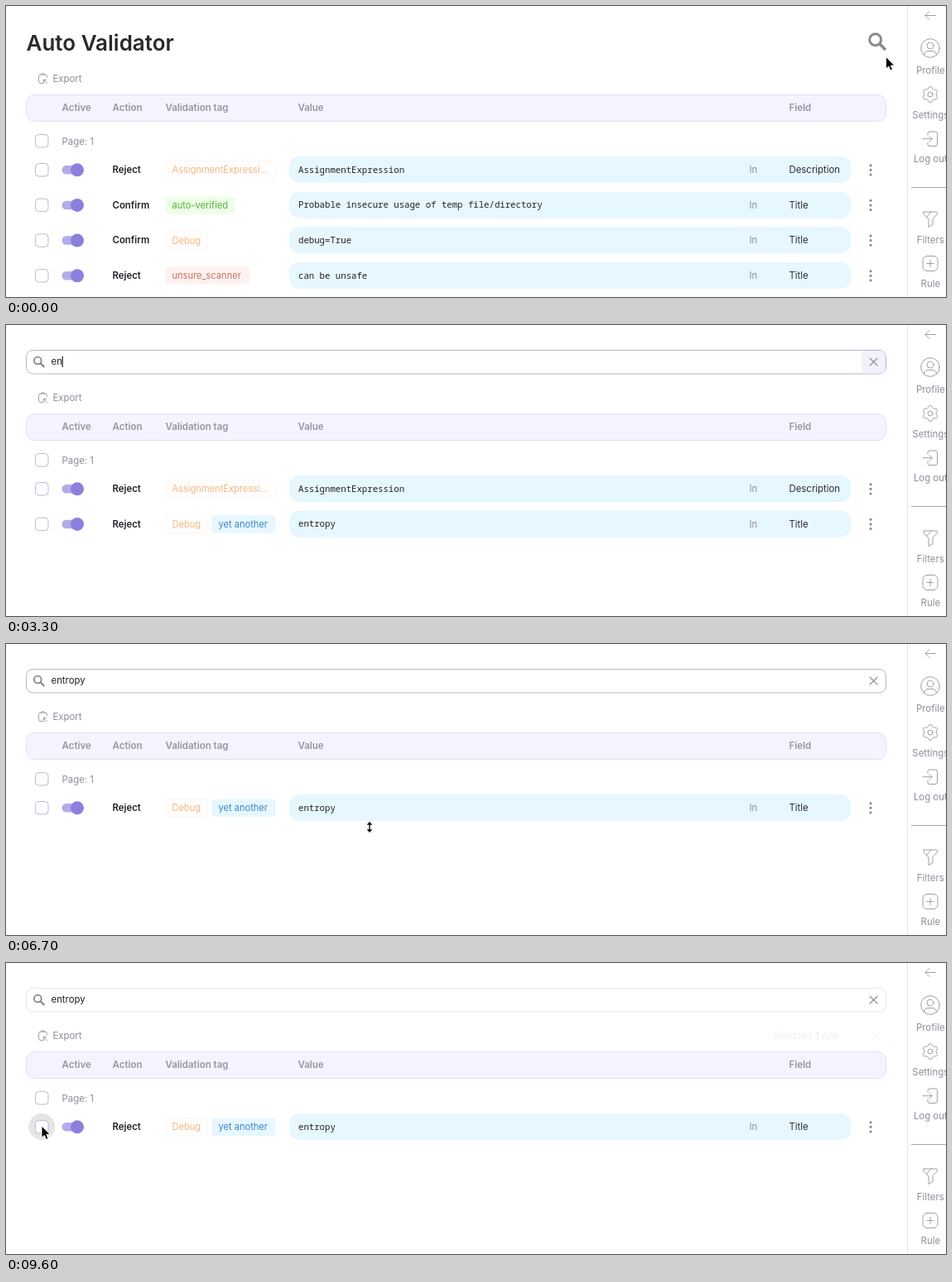
These frames come from a looping animation (1135x352 px, 9.7 s). An HTML page:

```html
<!DOCTYPE html>
<html lang="en">
<head>
<meta charset="utf-8">
<title>Rule search</title>
<style>
  html, body { margin: 0; width: 100%; height: 100%; overflow: hidden; background: #fff; }
  svg { display: block; width: 1135px; height: 352px; }
  text { font: 400 11.4px Inter, sans-serif; fill: #2b2b33; }
  .bold { font-weight: 600; fill: #222228; }
  .title { font-size: 26px; font-weight: 600; fill: #29292e; }
  .head { font-size: 11.5px; font-weight: 600; fill: #9795a1; }
  .soft { fill: #8f8e99; }
  .hint { font-size: 10.6px; }
  .mono { font: 400 10.68px "Noto Sans Mono", monospace; fill: #222; }
  .query { fill: #222; }
  .mid { text-anchor: middle; }
  .tag { font-size: 11.1px; }
  .line { fill: none; stroke: #95949f; stroke-width: .9; stroke-linecap: round; stroke-linejoin: round; }
  .box { fill: #fff; stroke: #bdb9d2; }
  .lens { fill: none; stroke: #8b8b8b; }
</style>
</head>
<body>
<svg id="stage" viewBox="0 0 1135 352"></svg>
<script>
const LOOP = 9700, STEP = 100, ROW_TOP = 198, ROW_GAP = 42.65;
const stage = document.getElementById('stage');

const text = (x, y, str, cls = '', extra = '') =>
  `<text x="${x}" y="${y}" class="${cls}" ${extra}>${str}</text>`;
const rect = (x, y, w, h, r, attrs) =>
  `<rect x="${x}" y="${y}" width="${w}" height="${h}" rx="${r}" ${attrs}/>`;
const circle = (x, y, r, attrs) => `<circle cx="${x}" cy="${y}" r="${r}" ${attrs}/>`;
const path = (d, attrs = 'class="line"') => `<path d="${d}" ${attrs}/>`;
const group = (id, body, attrs = '') => `<g id="${id}" ${attrs}>${body}</g>`;
const checkbox = y => rect(35.5, y - 7.5, 15.5, 15.5, 4, 'class="box"');

const TAGS = {
  assign: ['AssignmentExpressi…', 133, '#fffefd', '#f0b885', '#faf7f4'],
  verified: ['auto-verified', 84, '#eeffe8', '#55b236', 'none'],
  debug: ['Debug', 51, '#fffefd', '#f0b885', '#faf7f4'],
  unsure: ['unsure_scanner', 102, '#fef2f0', '#cb705a', 'none'],
  another: ['yet another', 77, '#e6f7ff', '#3a86c6', 'none'],
};
const RULES = [
  ['Reject', ['assign'], 'AssignmentExpression', 'Description'],
  ['Confirm', ['verified'], 'Probable insecure usage of temp file/directory', 'Title'],
  ['Confirm', ['debug'], 'debug=True', 'Title'],
  ['Reject', ['unsure'], 'can be unsafe', 'Title'],
  ['Reject', ['debug', 'another'], 'entropy', 'Title'],
];

function tagList(names) {
  let x = 192.5;
  return names.map(name => {
    const [label, w, fill, ink, edge] = TAGS[name];
    const out = rect(x, -10.5, w, 21.5, 4, `fill="${fill}" stroke="${edge}"`) +
      text(x + 8, 4.3, label, 'tag', `style="fill:${ink}"`);
    x += w + 5;
    return out;
  }).join('');
}

const ruleRow = ([action, tags, value, field], i) => group('rule' + i,
  checkbox(0) +
  rect(67.5, -5, 25, 10.5, 5.2, 'fill="#b3abea"') + circle(86, .3, 8, 'fill="#8b80dc"') +
  text(128.5, 4, action, 'bold') + tagList(tags) +
  rect(342, -16, 678, 32, 12, 'fill="#e6f7ff"') +
  text(353, 3.7, value, 'mono') + text(897.5, 4, 'In', 'soft') + text(945.5, 4, field) +
  [-5.6, 0, 5.6].map(y => circle(1044, y + .3, 1.5, 'fill="#85848f"')).join(''));

function gear(cx, cy) {
  const points = [];
  for (let i = 0; i < 48; i++) {
    const a = i / 48 * 2 * Math.PI, r = 8.3 + 1.1 * Math.tanh(2.5 * Math.cos(6 * a));
    points.push(`${(cx + r * Math.sin(a)).toFixed(2)} ${(cy - r * Math.cos(a)).toFixed(2)}`);
  }
  return path('M' + points.join('L') + 'Z') + circle(cx, cy, 3, 'class="line"');
}

const sidebar =
  path('M1088.5 0V352', 'stroke="#e2e1e6"') +
  path('M1122.5 11.5H1110M1115 6.5L1110 11.5L1115 16.5') +
  circle(1116, 51, 11.3, 'class="line"') + circle(1116, 48, 4, 'class="line"') +
  path('M1108.5 59Q1109.5 54.5 1113 54.5H1119Q1122.5 54.5 1123.5 59') +
  gear(1116, 107) +
  path('M1113 156V154Q1113 152 1115 152H1122Q1124.5 152 1124.5 154.5V167Q1124.5 169.5 1122 169.5H1115Q1113 169.5 1113 167.5V165M1107 160.7H1118M1115 157.5L1118.2 160.7L1115 164') +
  path('M1093 219.5H1135', 'stroke="#a8a8ac"') +
  path('M1108.5 249H1123.5Q1125 249 1124.5 251.5L1119 257.5V264.5L1114 267.5V258L1108 251.5Q1107 249 1108.5 249ZM1117 249L1111.5 255.5') +
  rect(1107, 302.5, 18, 18, 5, 'class="line"') + path('M1116 307.5V315.5M1112 311.5H1120') +
  [['Profile', 82], ['Settings', 136], ['Log out', 188.5], ['Filters', 286.5], ['Rule', 339.5]]
    .map(([label, y]) => text(1116.3, y, label, 'soft mid')).join('');

const exportButton =
  path('M45 93.5H42Q39.5 93.5 39.5 91V85.5Q39.5 83 42 83H47Q49.5 83 49.5 85.5V86.5M42.5 83.5Q42.5 81.5 44.5 81.5Q46.5 81.5 46.5 83.5M49.5 94L45.5 89.5M45.5 92.5V89.3H48.7') +
  text(56.5, 91.7, 'Export', 'soft');

const tableHead =
  rect(24.5, 107.5, 1038, 32, 10, 'fill="#f5f3ff" stroke="#e2dff0"') +
  [[67.5, 'Active'], [128.5, 'Action'], [192.5, 'Validation tag'], [352.5, 'Value'], [945.5, 'Field']]
    .map(([x, label]) => text(x, 127.3, label, 'head')).join('') +
  checkbox(163) + text(67.5, 167.5, 'Page: 1', 'soft');

const titleBar =
  circle(1052.5, 43.5, 23, 'id="lensHover" fill="#000" opacity="0"') +
  circle(1052.5, 43.5, 0, 'id="ripple" fill="#000" opacity=".1"') +
  text(24.5, 54, 'Auto Validator', 'title') +
  circle(1049.7, 40.7, 7, 'class="lens" stroke-width="3"') +
  path('M1054.8 45.8L1062 53', 'class="lens" stroke-width="3.6"');

const searchBar =
  rect(24.5, 30.5, 1038, 28.5, 8, 'id="field" fill="#fff"') +
  circle(38.3, 43, 4.4, 'class="lens" stroke-width="1.9"') +
  path('M41.5 46.2L46.3 51', 'class="lens" stroke-width="2.4"') +
  text(54.5, 48.3, 'Search..', 'soft hint', 'id="hint"') +
  text(54.5, 48.3, '', 'query', 'id="query"') +
  path('M1033 31H1054.5Q1062 31 1062 38.5V51Q1062 58.5 1054.5 58.5H1040Q1033 58.5 1033 51.5Z', 'id="clearHover" fill="#f3f0fc"') +
  path('M1043.2 40.2L1052 49M1052 40.2L1043.2 49', 'id="clear" class="line" style="stroke-width:1.3"') +
  rect(0, 38, 1.1, 13, 0, 'id="caret" fill="#111"');

const selection =
  text(926.5, 91.7, 'Selected <tspan font-weight="700">1</tspan> rule', 'soft') +
  path('M1046.5 84L1054.5 92M1054.5 84L1046.5 92');

const pointers =
  group('arrow', path('M0 0V14.5L3.3 11.5L5.5 16.5L8.1 15.4L5.9 10.5H10.3Z',
    'fill="#000" stroke="#fff" stroke-width="1"')) +
  group('resize', path('M0 -7L4 -2.5H1V2.5H4L0 7L-4 2.5H-1V-2.5H-4Z',
    'fill="#000" stroke="#fff" stroke-width=".7"'));

stage.innerHTML = sidebar + exportButton + tableHead +
  group('titleBar', titleBar) + group('searchBar', searchBar) + group('selection', selection) +
  circle(43.3, 198, 16, 'id="checkHover" fill="#000" opacity=".1"') +
  RULES.map(ruleRow).join('') +
  group('checked', rect(35, 190, 16.5, 16.5, 4, 'fill="#8b80dc"') +
    path('M39 198.3L42 201.3L47.5 195.3', 'fill="none" stroke="#fff" stroke-width="1.7"')) +
  pointers;

const el = {};
stage.querySelectorAll('[id]').forEach(node => el[node.id] = node);
const show = (id, on) => el[id].style.display = on ? '' : 'none';
const set = (id, name, value) => el[id].setAttribute(name, value);
const clamp = v => Math.max(0, Math.min(1, v));

// Pointer stops: time, x, y
const TRACK = [
  [0, 1062.5, 61.5], [100, 1061.5, 60], [400, 1054, 50], [700, 1049.5, 47], [1500, 1049.5, 47],
  [1700, 1046, 41], [5600, 1046, 41], [5700, 1003, 66], [6000, 690, 170], [6300, 470, 232],
  [6500, 445, 227], [6700, 439, 221.5], [7600, 424, 214], [7800, 270, 205], [8100, 91.5, 194],
  [8300, 86, 195], [8600, 43, 197], [LOOP, 43, 197],
];
function pointerAt(t) {
  const i = TRACK.findIndex(stop => stop[0] > t);
  const [t0, x0, y0] = TRACK[i - 1], [t1, x1, y1] = TRACK[i];
  const k = (t - t0) / (t1 - t0);
  return [x0 + (x1 - x0) * k, y0 + (y1 - y0) * k];
}

const KEYS = [2600, 2900, 3800, 4100, 4600, 4800, 5200];
const OPEN = 1100, CHECK = 8700, UNCHECK = 9400;

function render(t) {
  const open = t >= OPEN, focused = open && t < CHECK;
  show('titleBar', !open);
  show('searchBar', open);
  set('lensHover', 'opacity', .05 * clamp((t - 200) / 300));
  set('ripple', 'r', 23 * clamp((t - 800) / 300));

  const typed = KEYS.filter(k => k <= t).length;
  el.query.textContent = 'entropy'.slice(0, typed);
  show('hint', !typed);
  show('clear', typed);
  show('clearHover', typed && t < 5700);
  set('field', 'stroke', focused ? '#b9b2cf' : '#e6e5ee');
  const lastKey = typed ? KEYS[typed - 1] : OPEN;
  show('caret', focused && Math.floor((t - lastKey) / 500) % 2 === 0);
  set('caret', 'x', 54.3 + (typed ? el.query.getComputedTextLength() : 0));

  const visible = t < 3300 ? [0, 1, 2, 3] : t < 4300 ? [0, 4] : [4];
  RULES.forEach((_, i) => {
    const slot = visible.indexOf(i);
    show('rule' + i, slot >= 0);
    set('rule' + i, 'transform', `translate(0 ${ROW_TOP + Math.max(0, slot) * ROW_GAP})`);
  });

  const [x, y] = pointerAt(t);
  const hidden = t >= KEYS[0] && t < 5700;
  const resizing = t >= 1600 && t < 7800;
  show('arrow', !hidden && !resizing);
  show('resize', !hidden && resizing);
  for (const id of ['arrow', 'resize']) set(id, 'transform', `translate(${x} ${y})`);

  show('checkHover', t > 8000 && x < 59);
  show('checked', t >= CHECK && t < UNCHECK);
  set('selection', 'opacity', clamp((t - CHECK + 100) / 400) * clamp((9640 - t) / 300));
}

function tick(now) {
  render(Math.floor(now % LOOP / STEP) * STEP);
  requestAnimationFrame(tick);
}
render(0);
requestAnimationFrame(tick);
</script>
</body>
</html>
```
